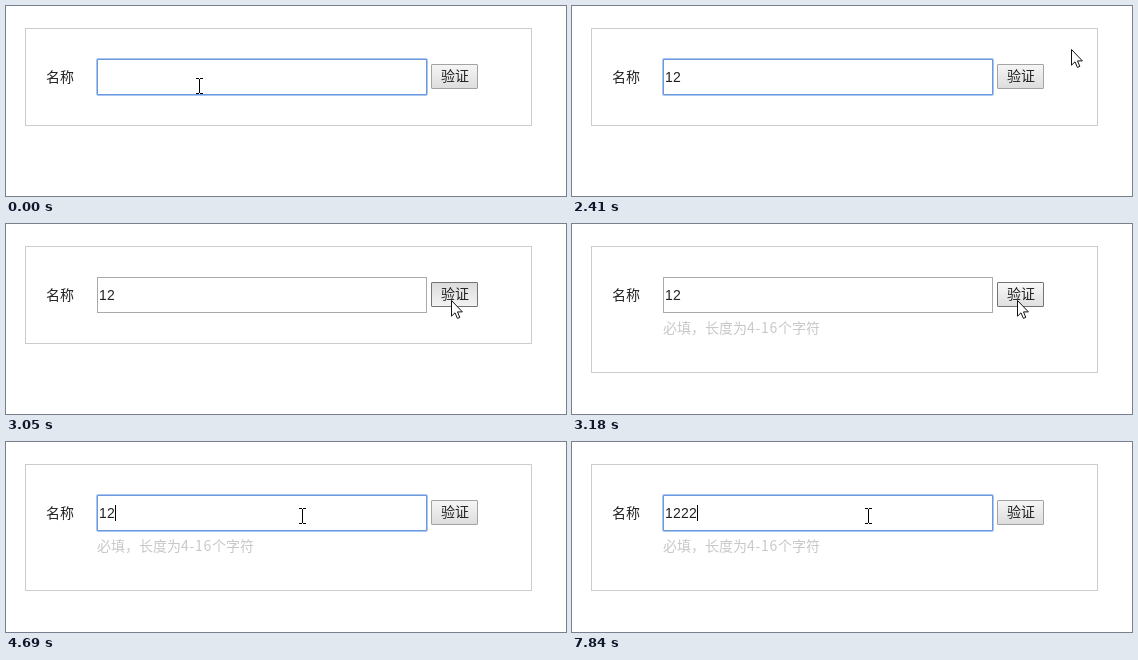
An HTML page that plays this animation: 560x190 px, repeating every 8000 ms.

```html
<!DOCTYPE html>
<html lang="zh-CN">
<head>
<meta charset="utf-8">
<title>名称验证</title>
<style>
  html, body { margin: 0; width: 560px; height: 190px; overflow: hidden; background: #fff; }
  body { position: relative; color: #222; font: 14px/20px "Noto Sans CJK SC", sans-serif; }
  body > *, #field > * { position: absolute; box-sizing: border-box; white-space: nowrap; }
  #panel { left: 19px; top: 22px; width: 507px; border: 1px solid #ccc; }
  #label { left: 40px; top: 60px; }
  #field { left: 91px; top: 53px; width: 330px; height: 36px; border: 1px solid #a9a9a9; background: #fff; }
  #ring { left: -2px; top: -2px; width: 332px; height: 38px; border: 1px solid #a9c5f3;
          border-radius: 2px; box-shadow: inset 0 0 0 1px #6c98de; }
  #value { left: 1px; top: 0; height: 34px; overflow: hidden; letter-spacing: .215px;
           font: 14px/34px "Liberation Sans", Arial, sans-serif; }
  #caret { left: 1px; top: 9px; width: 1px; height: 16px; background: #000; }
  #button { left: 425px; top: 58px; width: 47px; height: 25px; border: 1px solid #a3a3a3;
            border-radius: 1px; line-height: 21px; padding-left: 9px; }
  #hint { left: 91px; top: 93px; color: #c8c8c8; }
  #hint span { letter-spacing: .7px; }
  svg { left: 0; top: 0; overflow: visible; }
</style>
</head>
<body>
<div id="panel"></div>
<div id="label">名称</div>
<div id="field">
  <div id="ring"></div>
  <div id="value">1222</div>
  <div id="caret"></div>
</div>
<div id="button">验证</div>
<div id="hint">必填，长度为<span>4-16</span>个字符</div>
<svg id="beam" width="7" height="16" shape-rendering="crispEdges">
  <path d="M0 .5h3M4 .5h3M3.5 1v14M0 15.5h3M4 15.5h3" fill="none" stroke="#000"/>
</svg>
<svg id="arrow" width="12" height="19">
  <path d="M.5 .5V16.2L4 12.8L6.4 18.4L8.8 17.4L6.5 11.9H11.4Z" fill="#fff" stroke="#111"/>
</svg>
<script>
const LOOP = 8000;

// Plays a table of [time, value] as hard steps.
function step(id, prop, rows) {
  const frames = rows.map(([t, v]) => ({ offset: t / LOOP, [prop]: v, easing: 'step-end' }));
  frames.push({ ...frames[frames.length - 1], offset: 1 });
  document.getElementById(id).animate(frames, { duration: LOOP, iterations: Infinity });
}

const map = (rows, fn) => rows.map(([t, ...v]) => [t, fn(...v)]);
const toggle = (on, ...times) => [0, ...times].map((t, i) => [t, (i + on) % 2]);
const move = (x, y) => `translate(${x}px, ${y}px)`;

// Typing
const typed = [[0, 0], [1340, 1], [1470, 2], [6500, 3], [7840, 4]];
step('value', 'width', map(typed, n => n * 8 + 'px'));
step('caret', 'transform', map(typed, n => move(n * 8, 0)));
step('caret', 'opacity', toggle(0, 130, 670, 1220, 2020, 2550, 3050, 4690, 5250,
  5810, 6350, 6500, 7050, 7580));
step('ring', 'opacity', toggle(1, 3050, 4690));

// Validation message
step('panel', 'height', [[0, '98px'], [3180, '127px']]);
step('hint', 'opacity', toggle(0, 3180));

// Button looks
const looks = {
  idle: ['#a3a3a3', '#f5f5f5, #dddddd'],
  hover: ['#747474', '#f8f8f8, #e0e0e0'],
  down: ['#747474', '#dcdcdc, #f3f3f3']
};
const presses = [[0, 'idle'], [2800, 'hover'], [3050, 'down'], [3180, 'hover'], [3880, 'idle']];
step('button', 'borderColor', map(presses, k => looks[k][0]));
step('button', 'backgroundImage', map(presses, k => `linear-gradient(${looks[k][1]})`));

// Pointer
step('beam', 'transform', map([[0, 190, 72], [2150, 330, 54], [3880, 372, 68],
  [4010, 312, 66], [4140, 293, 66]], move));
step('beam', 'opacity', toggle(1, 2280, 3880));
step('arrow', 'transform', map([[0, 549, 5], [2410, 499, 43], [2550, 472, 101],
  [2680, 450, 86], [2800, 445, 76], [3750, 432, 75]], move));
step('arrow', 'opacity', toggle(0, 2280, 3880));
</script>
</body>
</html>
```
